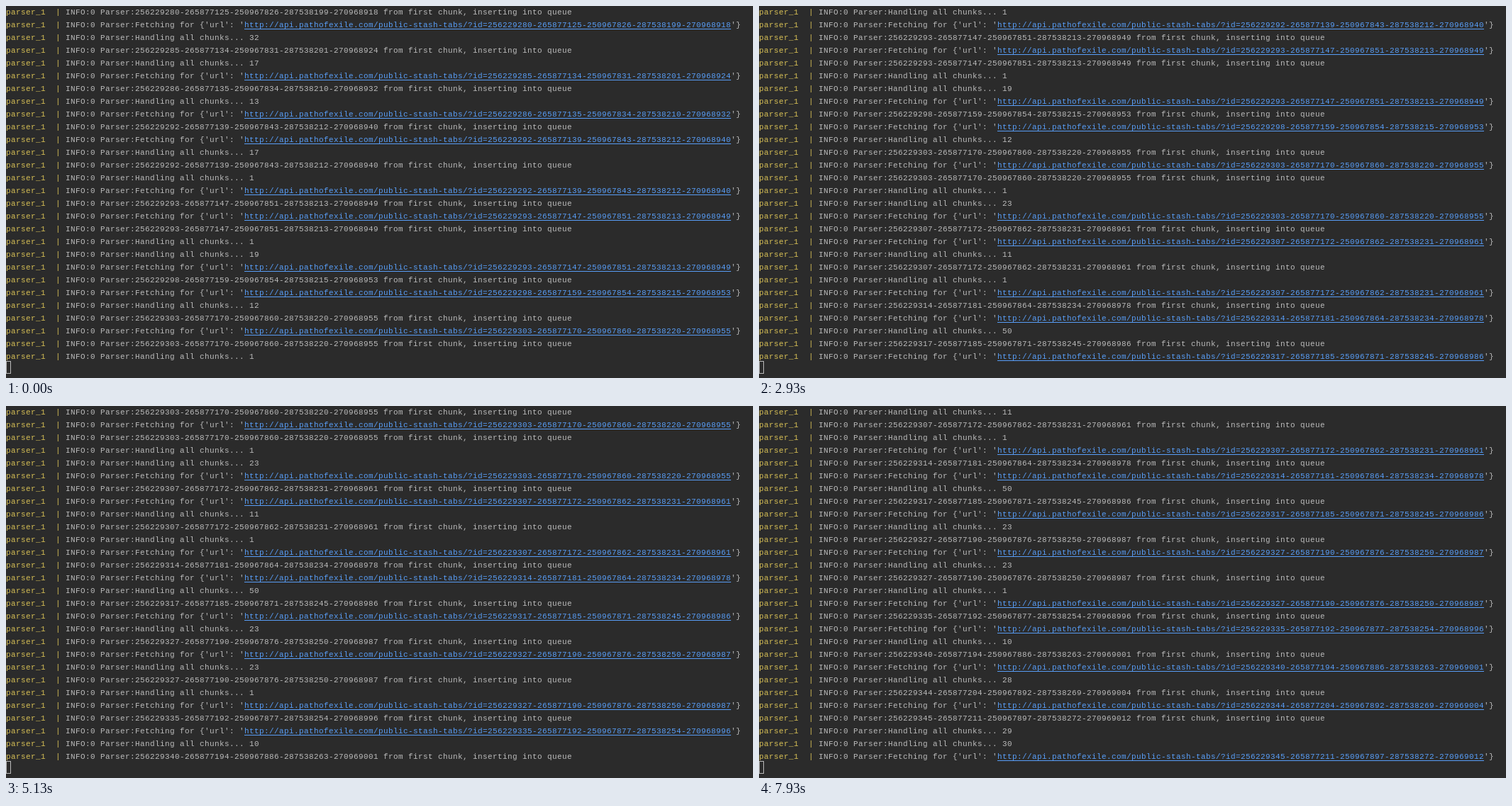
An HTML page with a canvas for the animation above (8 s loop, 1053 by 525 pixels).

```html
<!DOCTYPE html>
<html lang="en">
<head>
<meta charset="utf-8">
<title>Parser log</title>
<style>
  html, body { margin: 0; width: 100%; height: 100%; overflow: hidden; background: #2b2b2b; }
  canvas { display: block; }
</style>
</head>
<body>
<canvas id="terminal" width="1053" height="525"></canvas>
<script>
const LOOP = 8000;
const ROWS = 28;
const CELL = { width: 7, height: 18, baseline: 12 };
const COLORS = { back: '#2b2b2b', text: '#bbbbbb', prefix: '#d6bf55', link: '#589df6' };

const ID_BASE = [256229000, 265877000, 250967000, 287538000, 270968000];
const ids = Object.fromEntries(Object.entries({
  A: '280 125 826 199 918',
  B: '285 134 831 201 924',
  C: '286 135 834 210 932',
  D: '292 139 843 212 940',
  E: '293 147 851 213 949',
  F: '298 159 854 215 953',
  G: '303 170 860 220 955',
  H: '307 172 862 231 961',
  I: '314 181 864 234 978',
  J: '317 185 871 245 986',
  K: '327 190 876 250 987',
  L: '335 192 877 254 996',
  M: '340 194 886 263 1001',
  N: '344 204 892 269 1004',
  O: '345 211 897 272 1012'
}).map(([key, parts]) =>
  [key, parts.split(' ').map((part, i) => ID_BASE[i] + Number(part)).join('-')]));

// "X+" queues an id, "X>" fetches it, a number is a chunk count.
const log = `A+ A> 32 B+ 17 B> C+ 13 C> D+ D> 17 D+ 1 D> E+ E> E+ 1 19 E> F+ F> 12
  G+ G> G+ 1 23 G> H+ H> 11 H+ 1 H> I+ I> 50 J+ J> 23 K+ K> 23 K+ 1 K> L+ L> 10
  M+ M> 28 N+ N> O+ 29 30 O>`.split(/\s+/);

// Arrival time of each line after the first screenful.
const arrivals = [
  70, 270, 530, 600, 730, 870, 930, 1330, 1800, 1870, 2330, 2530, 2930,
  3130, 3470, 3670, 3800, 3870, 3870, 4270, 4670, 4730, 4930, 5130, 5470, 5730,
  6870, 6870, 7330, 7400, 7400, 7930
];

const ctx = document.getElementById('terminal').getContext('2d');

function lineRuns(entry) {
  const prefix = ['parser_1  | ', COLORS.prefix];
  const plain = text => [text, COLORS.text];
  const id = ids[entry[0]];
  if (!id) return [prefix, plain(`INFO:0 Parser:Handling all chunks... ${entry}`)];
  if (entry[1] === '+') {
    return [prefix, plain(`INFO:0 Parser:${id} from first chunk, inserting into queue`)];
  }
  return [
    prefix,
    plain("INFO:0 Parser:Fetching for {'url': '"),
    [`http://api.pathofexile.com/public-stash-tabs/?id=${id}`, COLORS.link],
    plain("'}")
  ];
}

function drawLine(entry, row) {
  const baseline = row * CELL.height + CELL.baseline;
  let x = 0;
  for (const [text, color] of lineRuns(entry)) {
    const start = x;
    ctx.fillStyle = color;
    for (const char of text) {
      ctx.fillText(char, x, baseline);
      x += CELL.width;
    }
    if (color === COLORS.link) ctx.fillRect(start, baseline + 2, x - start, 1);
  }
}

function draw(top) {
  ctx.fillStyle = COLORS.back;
  ctx.fillRect(0, 0, 1053, 525);
  ctx.font = '11px "Liberation Mono", monospace';
  ctx.textBaseline = 'alphabetic';
  log.slice(top, top + ROWS).forEach(drawLine);
  ctx.strokeStyle = COLORS.text;
  ctx.strokeRect(0.5, 501.5, 6, 17);
}

const began = performance.now();
let shown = -1;

function tick() {
  const time = (performance.now() - began) % LOOP;
  const top = arrivals.filter(at => at <= time).length;
  if (top !== shown) draw(shown = top);
  requestAnimationFrame(tick);
}
tick();
</script>
</body>
</html>
```
